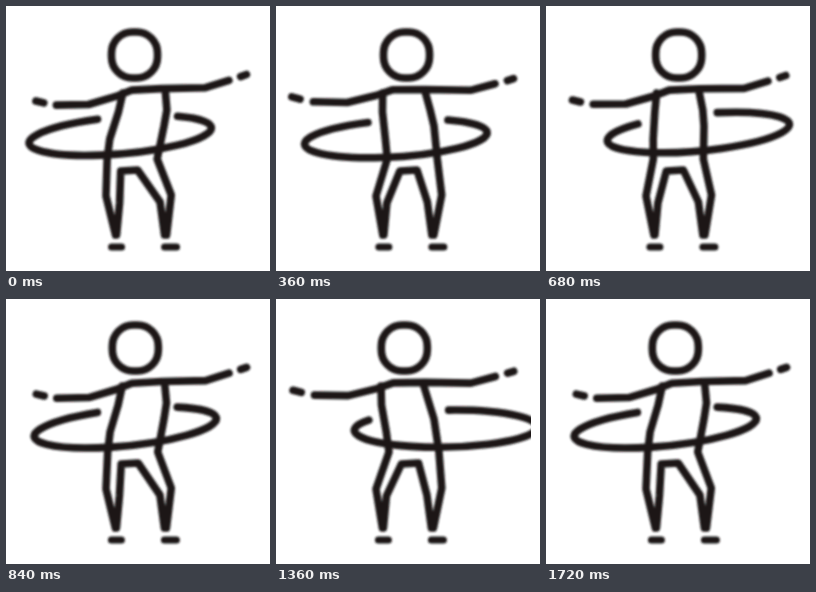
Recreate the animation shown at these times as an HTML page. Size 264 by 265 pixels, loop 1.76 s.

```html
<!DOCTYPE html>
<html lang="en">
<head>
<meta charset="utf-8">
<title>Hula hoop</title>
<style>
  html, body { margin: 0; width: 100%; height: 100%; overflow: hidden; background: #fff; }
  svg { display: block; width: 100%; height: 100%; }
</style>
</head>
<body>
<svg viewBox="0 0 264 265">
  <defs>
    <clipPath id="stage"><rect x="9" y="0" width="246" height="265"/></clipPath>
    <filter id="soft" x="0" y="0" width="264" height="265" filterUnits="userSpaceOnUse">
      <feGaussianBlur stdDeviation="1"/>
    </filter>
  </defs>
  <g clip-path="url(#stage)">
    <g filter="url(#soft)" fill="none" stroke="#1a1718" stroke-width="7.6" stroke-linejoin="round" stroke-linecap="round">
      <rect id="head" y="26" width="46" height="46" rx="21"/>
      <path id="arms"/>
      <path id="body"/>
      <path id="feet" stroke-width="7"/>
      <path id="hoop"/>
    </g>
  </g>
</svg>
<script>
const LOOP = 1760, SWING = LOOP / 2, STEP = 40;
const { sin, cos, min, max, sqrt, PI } = Math;
const $ = id => document.getElementById(id);

// The neutral pose, as lists of points.
const arms = [
  [[23, 93], [31, 95]],
  [[44, 97.5], [77, 97.5], [105, 90], [121, 84], [152, 83], [197, 83], [221, 76]],
  [[233, 72.5], [239, 70.5]]
];
const body = [
  [[111, 87], [109, 106], [107, 133], [107, 153], [100, 190], [108, 229]],
  [[153.5, 86], [157, 104], [158, 120], [157, 153], [165.5, 189], [159, 229]],
  [[109, 229], [112, 197], [120, 165], [137, 164], [152.5, 196], [157, 229]]
];
const feet = [
  [[104, 241], [114, 241]],
  [[157, 241], [169, 241]]
];

// Shoulders and hips swing opposite ways; the ankles hardly move.
const lean = amount => ([x, y]) =>
  [x + 6 * amount * sin((min(y, 196) - 120) * PI / 70), y];

// The arms slide sideways and tip about the chest.
const tip = amount => ([x, y]) =>
  [x - amount * (8 - 0.027 * x), y + amount * (x - 130) / 50];

const trace = (lines, move) =>
  lines.map(points => "M" + points.map(move).join("L")).join("");

// The back of the hoop is open behind the torso.
function hoopPath(cx, cy, degrees) {
  const rx = 91.5, ry = 18.5, a = degrees * PI / 180;
  const back = x => {
    const u = max(-1, min(1, (x - cx) / rx));
    const px = rx * u, py = -ry * sqrt(1 - u * u);
    return [cx + px * cos(a) - py * sin(a), cy + px * sin(a) + py * cos(a)];
  };
  return `M${back(173)}A${rx} ${ry} ${degrees} 1 1 ${back(93)}`;
}

function draw(t) {
  const p = 2 * PI * t / SWING;
  const sway = -cos(p - 0.2), reach = -cos(p + 0.35);

  $("head").setAttribute("x", 107.5 + 2.2 * cos(2 * p - 3.58));
  $("arms").setAttribute("d", trace(arms, tip(reach)));
  $("body").setAttribute("d", trace(body, lean(sway)));
  $("feet").setAttribute("d", trace(feet, lean(sway)));

  const x = 128 + 42.8 * cos(p - 4.2) + 11.9 * cos(2 * p - 0.92);
  const y = 130 + 3.5 * cos(p - 1.75);
  const tilt = 4 + 1.6 * cos(p) - 1.6 * cos(2 * p - 1.13);
  $("hoop").setAttribute("d", hoopPath(x, y, -tilt));
}

const start = performance.now();
function tick() {
  const t = (performance.now() - start) % LOOP;
  draw(Math.floor(t / STEP) * STEP);
  requestAnimationFrame(tick);
}
tick();
</script>
</body>
</html>
```
